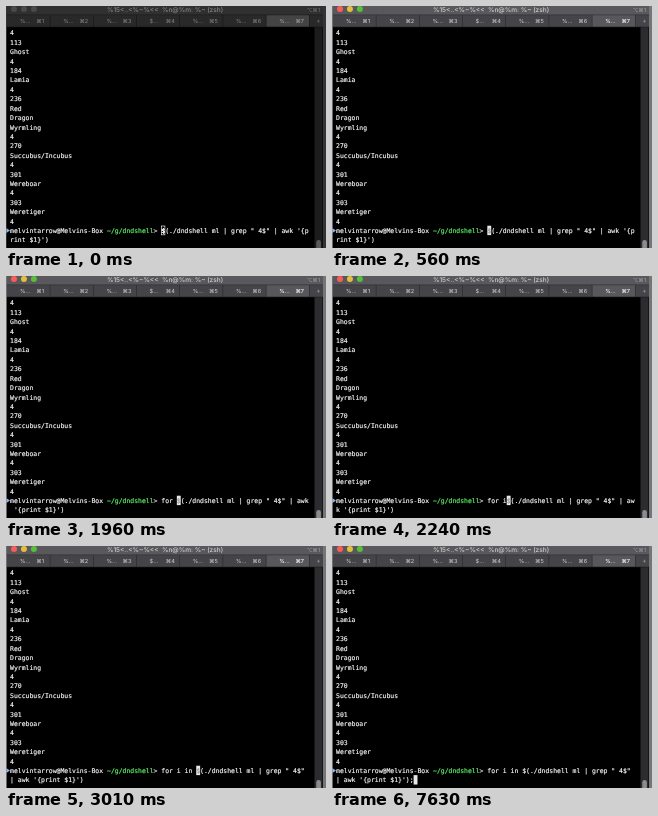
An HTML page for the animation above (8000 ms loop, 320x242 px).

```html
<!DOCTYPE html>
<html lang="en">
<head>
<meta charset="utf-8">
<title>Terminal</title>
<style>
  html, body { margin: 0; width: 100%; height: 100%; overflow: hidden; background: #000; }
  svg { display: block; width: 100vw; height: 100vh; }
  text { white-space: pre; text-rendering: geometricPrecision; }
  .mono {
    font: 6.445px "DejaVu Sans Mono", "Liberation Mono", monospace;
    fill: var(--ink, #f6f6f6); stroke: var(--ink, #f6f6f6); stroke-width: 0.18;
  }
  .ui { font: 500 5.5px Inter, "DejaVu Sans", sans-serif; }
  .title { font-size: 6.5px; }
</style>
</head>
<body>
<svg id="stage" viewBox="0 0 320 242" preserveAspectRatio="none"></svg>
<script>
const LOOP = 8000, FOCUS_AT = 420, END_AT = 5950, SEMICOLON_AT = 7630;
const CELL = 3.88, LINE = 9.41, LEFT = 4, TOP = 22.1, COLS = 77;
const TAB = 43.2, TAB_LEFT = 0.9, TABS = 7;

const themes = {
  active: {
    titleBar: "#59585c", tabBar: "#454448", tab: "#58575b", line: "#29292b",
    title: "#d0d0d2", hint: "#98979b", label: "#c4c4c6", activeLabel: "#ffffff",
    edge: "#757479", track: "#2c2c2e", thumb: "#8c8b8f"
  },
  inactive: {
    titleBar: "#303031", tabBar: "#29292a", tab: "#444445", line: "#171718",
    title: "#858585", hint: "#6a6a6a", label: "#7c7c7c", activeLabel: "#a0a0a0",
    edge: "#343436", track: "#1c1c1d", thumb: "#5a5a5c"
  }
};

const output = ["4", "113", "Ghost", "4", "184", "Lamia", "4", "236", "Red", "Dragon",
  "Wyrmling", "4", "270", "Succubus/Incubus", "4", "301", "Wereboar", "4", "303",
  "Weretiger", "4"];
const user = "melvintarrow@Melvins-Box ";
const path = "~/g/dndshell";
const promptLength = user.length + path.length + 2;
const promptRow = output.length;
const loopHead = "for i in ";
const keyTimes = [1400, 1610, 1820, 1960, 2240, 2380, 2520, 2800, 3010];
const tail = `$(./dndshell ml | grep " 4$" | awk '{print $1}')`;

const stage = document.getElementById("stage");
const themed = [];

function set(el, attrs) {
  for (const key in attrs) el.setAttribute(key, attrs[key]);
}
function add(name, attrs, content = "") {
  const el = document.createElementNS("http://www.w3.org/2000/svg", name);
  set(el, attrs);
  el.textContent = content;
  return stage.appendChild(el);
}
// Chrome parts take their fill from the current theme.
function addThemed(role, name, attrs, content) {
  themed.push({ role, el: add(name, attrs, content) });
}
const box = (role, x, y, width, height, rx = 0) =>
  addThemed(role, "rect", { x, y, width, height, rx });
const label = (role, x, y, content, attrs = {}) =>
  addThemed(role, "text", { class: "ui", x, y, ...attrs }, content);

const colX = col => LEFT + col * CELL;
const rowY = row => TOP + row * LINE;
const mono = (content, row, col = 0, attrs = {}) =>
  add("text", { class: "mono", x: colX(col), y: rowY(row) + 7.3, ...attrs }, content);

// Window chrome
add("rect", { width: 320, height: 242, fill: "#000" });
box("titleBar", 0, 0, 320, 9);
box("tabBar", 0, 9, 320, 12);
box("tab", TAB_LEFT + TAB * (TABS - 1), 9, TAB, 12);
box("line", 0, 8.6, 320, 0.6);
box("line", 0, 20.6, 320, 0.6);

const lights = ["#fc5b57", "#e5bf3c", "#57c038"].map((color, i) => ({
  color, dot: add("circle", { cx: 8 + i * 9.95, cy: 3, r: 3 })
}));
label("title", 159, 5.6, "%15<..<%~%<<  %n@%m: %~ (zsh)",
  { class: "ui title", "text-anchor": "middle" });
label("hint", 314, 5.6, "⌥⌘1", { "text-anchor": "end" });

for (let i = 0; i < TABS; i++) {
  const x = i * TAB;
  const role = i === TABS - 1 ? "activeLabel" : "label";
  box("line", TAB_LEFT + x + TAB - 0.3, 9, 0.6, 12);
  label(role, x + 14, 17.1, (i === 3 ? "$" : "%") + "...");
  label(role, x + 30.2, 17.1, "⌘" + (i + 1));
}
label("hint", 310.2, 17.4, "+", { class: "ui title" });

// Scrollbar and window edges
box("track", 308.5, 21.2, 8, 221);
box("thumb", 310.3, 234, 4.6, 12, 2.3);
box("edge", 0, 0, 0.9, 242);
box("edge", 317, 0, 3, 242);

// Terminal contents
output.forEach((line, row) => mono(line, row));
add("path", { d: "M0.4 222.2 L4 224.6 L0.4 227 Z", fill: "#8fb8e8" });
mono(user, promptRow);
mono(path, promptRow, user.length, { style: "--ink:#5cf268" });
mono(">", promptRow, user.length + path.length);
const firstLine = mono("", promptRow, promptLength);
const secondLine = mono("", promptRow + 1);
const cursor = add("rect", { height: LINE });
const cursorChar = mono("", promptRow);

function paintChrome(focused) {
  const theme = focused ? themes.active : themes.inactive;
  for (const { role, el } of themed) el.setAttribute("fill", theme[role]);
  for (const { color, dot } of lights) dot.setAttribute("fill", focused ? color : "#4a4a4b");
}

function render(t) {
  const focused = t >= FOCUS_AT;
  const typed = loopHead.slice(0, keyTimes.filter(k => t >= k).length);
  const command = typed + tail + (t >= SEMICOLON_AT ? ";" : "");
  const split = COLS - promptLength;
  firstLine.textContent = command.slice(0, split);
  secondLine.textContent = command.slice(split);
  paintChrome(focused);

  const index = t >= END_AT ? command.length : typed.length;
  const cell = promptLength + index;
  const x = colX(cell % COLS);
  const y = rowY(promptRow + Math.floor(cell / COLS));
  set(cursor, focused
    ? { x, y, width: CELL, height: LINE, fill: "#e8e8e8", stroke: "none" }
    : { x: x + 0.3, y: y + 0.3, width: CELL - 0.6, height: LINE - 0.6,
        fill: "none", stroke: "#e8e8e8", "stroke-width": 0.7 });
  set(cursorChar, { x, y: y + 7.3, style: "--ink:" + (focused ? "#999" : "#f6f6f6") });
  cursorChar.textContent = command[index] || "";
}

const start = performance.now();
function frame() {
  render((performance.now() - start) % LOOP);
  requestAnimationFrame(frame);
}
frame();
</script>
</body>
</html>
```
